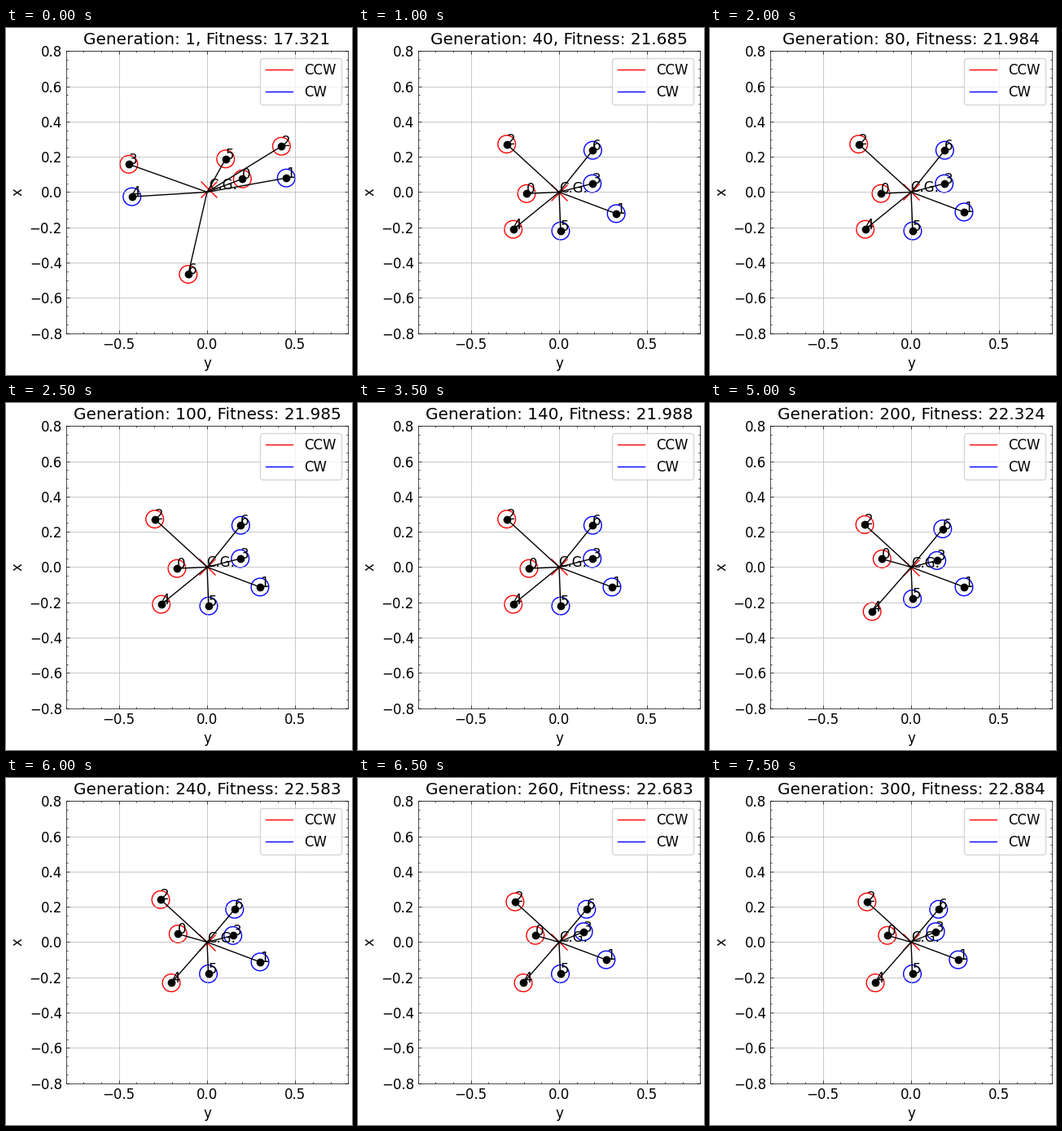
Animation of 425x426 px, one loop 8 s. Source, as a matplotlib script:

```python
import matplotlib.pyplot as plt
import numpy as np
from matplotlib.animation import FuncAnimation
from matplotlib.patches import Circle

W, H, DPI = 425, 426, 100
LEFT, BOTTOM, SIDE = 73.75, 51.28, 346.5
STEPS, STEP_GENS = 16, 20
CG_SHARE = 0.4

plt.rcParams.update({
    "font.family": "DejaVu Sans",
    "font.size": 12,
    "axes.titlesize": "large",
    "axes.linewidth": .5,
    "grid.linewidth": .5,
    "lines.linewidth": 1,
})
for axis, far_side in (("xtick", "top"), ("ytick", "right")):
    plt.rcParams.update({
        f"{axis}.direction": "in",
        f"{axis}.{far_side}": True,
        f"{axis}.minor.visible": True,
        f"{axis}.major.size": 3,
        f"{axis}.minor.size": 1.5,
        f"{axis}.major.width": .5,
        f"{axis}.minor.width": .5,
    })

# key poses, one complex point per rotor
FIRST = np.array([.200+.075j, .449+.080j, .422+.260j, -.444+.158j,
                  -.426-.026j, .105+.188j, -.107-.466j])
SETTLED = np.array([-.171-.008j, .300-.113j, -.297+.272j, .188+.048j,
                    -.260-.211j, .009-.220j, .191+.237j])
FINAL = np.array([-.135+.038j, .267-.100j, -.250+.228j, .139+.059j,
                  -.203-.231j, .007-.180j, .156+.186j])
# share of each rotor's shrinking done in its first jump; it turns by the rest
SHRINK_FIRST = np.array([0, 0, .7, 1, 0, 1, .35])
ROTORS = np.arange(len(FIRST))
CREEP = 1 + .08 * (ROTORS < 2)
SECOND_JUMP = np.where(np.isin(ROTORS, (4, 6)), 220, 260)

FIT_GENS = [1, 40, 80, 140, 200, 240, 300]
FIT_KEYS = [17.321, 21.685, 21.984, 21.988, 22.324, 22.583, 22.884]


def layout(gen):
    """Rotor positions: spread out, settle, then jump inward twice."""
    if gen < 20:
        return FIRST
    if gen < 60:
        return SETTLED * CREEP
    change = FINAL / SETTLED
    shrink = np.where(gen >= SECOND_JUMP, 1, SHRINK_FIRST * (gen >= 160))
    turn = np.where(gen >= SECOND_JUMP, 1, (1 - SHRINK_FIRST) * (gen >= 160))
    return SETTLED * np.abs(change) ** shrink * np.exp(1j * np.angle(change) * turn)


def ring_color(k, gen):
    ccw = k not in (1, 4) if gen == 1 else k in (0, 2, 4)
    return "r" if ccw else "b"


fig = plt.figure(figsize=(W / DPI, H / DPI), dpi=DPI)
ax = fig.add_axes([LEFT / W, BOTTOM / H, SIDE / W, SIDE / H])
ax.set(xlim=(-.8, .8), ylim=(-.8, .8), xlabel="y", ylabel="x")
ax.set_xticks([-.5, 0, .5])
ax.grid(True)

ax.plot([], [], "r-", label="CCW")
ax.plot([], [], "b-", label="CW")
ax.legend(loc="upper right")

cg_mark, = ax.plot([0], [0], "rx", ms=14)
cg_text = ax.text(0, 0, "C.G.")
arms, dots, rings, labels = [], [], [], []
for k in ROTORS:
    arms += ax.plot([0, 0], [0, 0], "k-")
    dots += ax.plot([0], [0], "ko", ms=6)
    rings.append(ax.add_patch(Circle((0, 0), .05, fill=False, lw=1)))
    labels.append(ax.text(0, 0, str(k)))


def draw(i):
    gen = max(1, STEP_GENS * i)
    pos = layout(gen)
    for k, p in enumerate(pos):
        x, y = p.real, p.imag
        arms[k].set_data([0, x], [0, y])
        dots[k].set_data([x], [y])
        rings[k].center = x, y
        rings[k].set_edgecolor(ring_color(k, gen))
        labels[k].set_position((x, y))
    cg = CG_SHARE * pos.mean()
    cg_mark.set_data([cg.real], [cg.imag])
    cg_text.set_position((cg.real, cg.imag))
    fitness = np.interp(gen, FIT_GENS, FIT_KEYS)
    ax.set_title(f"Generation: {gen}, Fitness: {fitness:.3f}")
    return []


anim = FuncAnimation(fig, draw, frames=STEPS, interval=500,
                     repeat=True, repeat_delay=0, blit=False)
plt.show()
```
